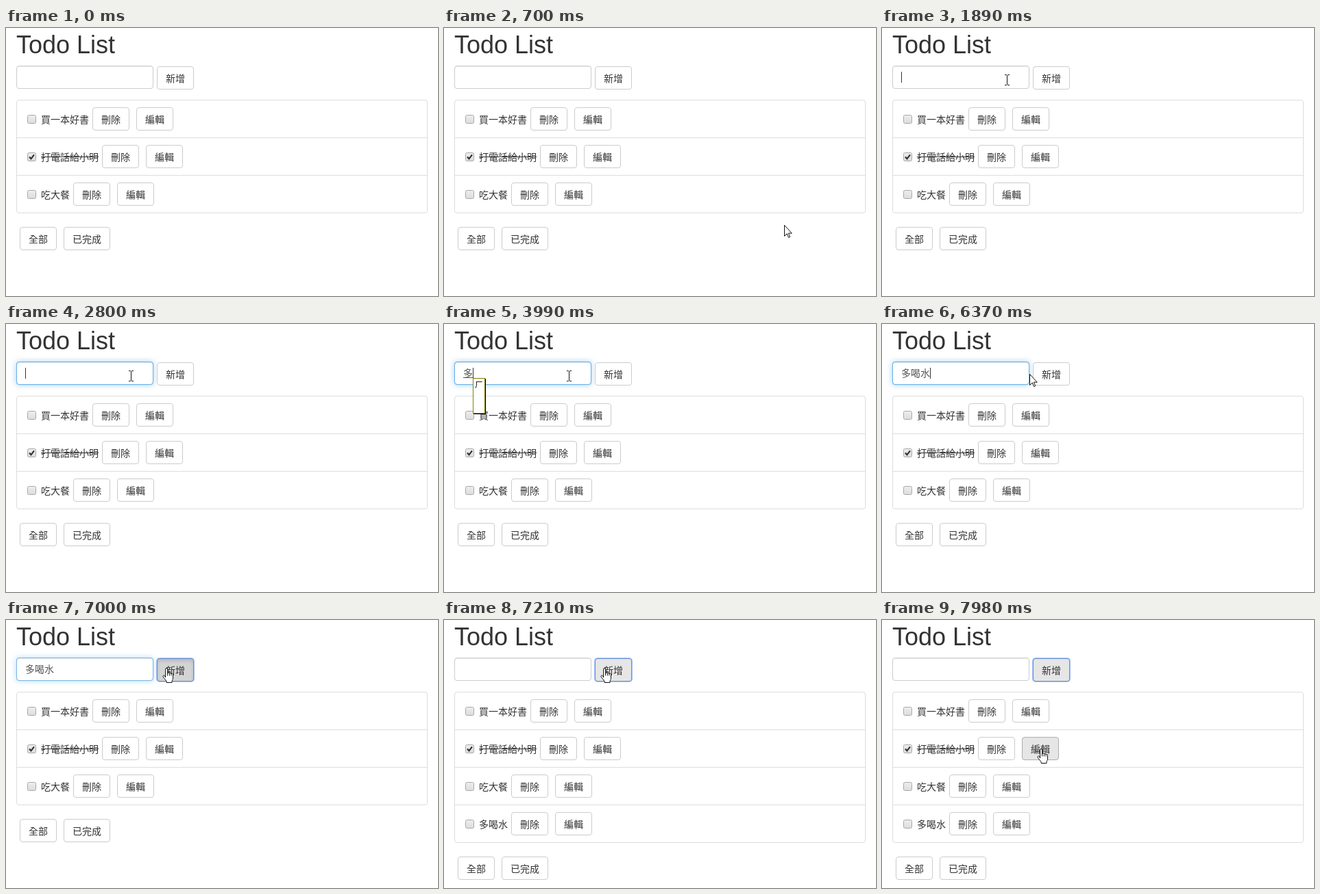
These frames come from a looping animation (630x392 px, 8000 ms). An HTML page:

```html
<!DOCTYPE html>
<html lang="zh-Hant">
<head>
<meta charset="utf-8">
<title>Todo List</title>
<style>
  html, body { margin: 0; width: 100%; height: 100%; overflow: hidden; background: #fff; }
  body {
    position: relative; color: #333;
    font: 300 14px/20px "Noto Sans CJK TC", "Noto Sans CJK", sans-serif;
  }
  body > * { position: absolute; box-sizing: border-box; }
  h1 {
    left: 15px; top: 5.4px; margin: 0; white-space: nowrap;
    font: 400 36px/1.1 "Liberation Sans", Arial, sans-serif;
  }
  .btn {
    box-sizing: border-box; height: 34px; padding: 6px 12px; white-space: nowrap;
    border: 1px solid #ccc; border-radius: 4px; background: #fff;
  }
  .btn.hover { background: #e6e6e6; border-color: #adadad; }
  #add { left: 220px; top: 56px; }
  #add.focus { background: #e6e6e6; border-color: #6d8fc8; box-shadow: 0 0 0 1px rgba(77,144,254,.5); }
  #add.active {
    background: #d4d4d4;
    box-shadow: 0 0 0 1px rgba(77,144,254,.5), inset 0 3px 5px rgba(0,0,0,.125);
  }

  #field, #glow { left: 15px; top: 55px; width: 200px; height: 34px; border-radius: 4px; }
  #field { border: 1px solid #ccc; box-shadow: inset 0 1px 1px rgba(0,0,0,.075); }
  #glow { border: 1px solid #66afe9; box-shadow: 0 0 8px rgba(102,175,233,.6); }
  #typed {
    left: 28px; top: 63px; height: 16px; line-height: 16px; color: #555;
    white-space: nowrap; border-bottom: 1px solid transparent;
  }
  #typed.composing { border-color: #555; }
  #caret { top: 64px; width: 1px; height: 16px; background: #333; }
  #ime {
    top: 79px; width: 18px; height: 52px; padding: 2px 2px 0; z-index: 1;
    background: #fff; border: 1px solid #808000; box-shadow: 1px 1px #000;
    color: #000; font-size: 12px; line-height: 12px; word-break: break-all;
  }

  ul {
    left: 15px; top: 105px; width: 600px; margin: 0; padding: 0; list-style: none;
    border: 1px solid #ddd; border-radius: 4px;
  }
  li { display: flex; align-items: center; height: 54px; padding-left: 15px; }
  li + li { border-top: 1px solid #ddd; }
  li svg { margin-right: 7px; }
  li .btn { margin: 0 5px; }
  .done { text-decoration: line-through; }
  #extra { display: none; }
  .added #extra { display: flex; }
  #filters { left: 20px; top: 291px; display: flex; gap: 10px; }
  .added #filters { top: 346px; }

  #pointer { left: 0; top: 0; overflow: visible; z-index: 2; }
  #pointer path { fill: #fff; stroke: #111; stroke-linejoin: round; }
  #pointer .thin { fill: none; }
</style>
</head>
<body>
  <h1>Todo List</h1>
  <div id="field" class="text"></div>
  <div id="glow"></div>
  <div id="typed"></div>
  <div id="caret"></div>
  <div id="ime"></div>
  <div id="add" class="btn">新增</div>
  <ul></ul>
  <div id="filters"><span class="btn">全部</span><span class="btn">已完成</span></div>

  <svg id="pointer" width="16" height="23">
    <g id="arrow"><path d="M.5 .5v16l3.7-3.6 2.4 5.6 2.1-.9-2.4-5.4h5z"/></g>
    <g id="beam" transform="translate(-3 -8)">
      <path class="thin" d="M0 .5h2.5l1 1 1-1H7M3.5 1v14M0 15.5h2.5l1-1 1 1H7"/>
    </g>
    <g id="hand" transform="translate(-6 -1)">
      <path d="M4.6 14V2.1a1.5 1.5 0 0 1 3 0V8.2a1.4 1.4 0 0 1 2.8 .2a1.3 1.3 0 0 1 2.6 .6a1.3 1.3 0 0 1 2.5 .8V15c0 2-1.5 3.5-1.5 5v1.5H6.2V20C5 17.5 2 15 .9 12.6a1.4 1.4 0 0 1 2.3-1.2z"/>
      <path class="thin" d="M7.6 8v3.5M10.4 8.5v3M13 9v2.5"/>
    </g>
  </svg>

<script>
  const LOOP = 8000, STEP = 70;
  const PRESS = 7000, RELEASE = 7140;
  const $ = id => document.getElementById(id);

  const todos = [['買一本好書'], ['打電話給小明', true], ['吃大餐'], ['多喝水']];
  const box = done => `<svg width="13" height="13">
    <defs><linearGradient id="shade" x2="0" y2="1"><stop stop-color="#eee"/><stop offset="1" stop-color="#dcdcdc"/></linearGradient></defs>
    <rect x=".5" y=".5" width="12" height="12" rx="2" fill="url(#shade)" stroke="#a8a8a8"/>
    ${done ? '<path d="M3 6.5l2.5 2.8L10 3.3" fill="none" stroke="#333" stroke-width="2.2"/>' : ''}</svg>`;
  document.querySelector('ul').innerHTML = todos.map(([text, done], i) =>
    `<li${i === 3 ? ' id="extra"' : ''}>${box(done)}<span${done ? ' class="done"' : ''}>${text}</span>` +
    '<span class="btn">刪除</span><span class="btn">編輯</span></li>').join('');

  // Pointer path: time, x, y of the hot spot
  const path = [
    [420, 531, 374], [700, 496, 288], [1190, 311, 138], [1330, 237, 98], [1540, 182, 76],
    [6020, 182, 76], [6580, 234, 71], [7770, 234, 71], [7910, 232, 140], [7980, 232, 189]
  ];
  const typing = [[0, ''], [3710, '多'], [4130, '多喝'], [4760, '多喝水'], [RELEASE, '']];
  const phonetics = [
    [0, ''], [3430, 'ㄉ'], [3500, 'ㄉㄨ'], [3570, 'ㄉㄨㄛ'], [3710, ''],
    [3990, 'ㄏ'], [4060, 'ㄏㄜ'], [4130, ''],
    [4480, 'ㄕ'], [4550, 'ㄕㄨ'], [4690, 'ㄕㄨㄟ'], [4760, '']
  ];
  const caretOn = [[1890, 2310], [2800, 3290], [3430, 5530], [6020, 6510]];

  const within = (t, a, b) => t >= a && t < b;
  const clamp = v => Math.min(1, Math.max(0, v));
  const latest = (list, t) => list.filter(e => e[0] <= t).pop()[1];
  const show = (el, on) => { el.style.visibility = on ? 'visible' : 'hidden'; };

  function locate(t) {
    const i = path.findIndex(p => p[0] > t);
    if (i < 0) return path[path.length - 1].slice(1);
    if (i === 0) return path[0].slice(1);
    const [t0, x0, y0] = path[i - 1], [t1, x1, y1] = path[i];
    const k = (t - t0) / (t1 - t0);
    return [Math.round(x0 + (x1 - x0) * k), Math.round(y0 + (y1 - y0) * k)];
  }

  const buttons = [...document.querySelectorAll('.btn')];
  function contains(el, x, y) {
    const r = el.getBoundingClientRect();
    return x >= r.left && x < r.right && y >= r.top && y < r.bottom;
  }

  function drawPointer(t) {
    const visible = t >= path[0][0];
    const [x, y] = locate(t);
    let kind = contains($('field'), x, y) ? 'beam' : 'arrow';
    for (const b of buttons) {
      const over = visible && contains(b, x, y);
      b.classList.toggle('hover', over);
      if (over) kind = 'hand';
    }
    $('pointer').style.transform = `translate(${x}px, ${y}px)`;
    for (const k of ['arrow', 'beam', 'hand']) show($(k), visible && k === kind);
  }

  function render(t) {
    const text = latest(typing, t), keys = latest(phonetics, t);
    const end = 28 + 14 * text.length + 'px';
    $('typed').textContent = text;
    $('typed').classList.toggle('composing', within(t, 3710, 5040));
    $('caret').style.left = $('ime').style.left = end;
    show($('caret'), caretOn.some(([a, b]) => within(t, a, b)));
    $('ime').textContent = keys;
    show($('ime'), keys !== '');

    $('glow').style.opacity = t < PRESS ? clamp((t - 1890) / 140) : clamp(1 - (t - 6960) / 200);
    $('add').classList.toggle('focus', t >= PRESS);
    $('add').classList.toggle('active', within(t, PRESS, RELEASE));
    document.body.classList.toggle('added', t >= RELEASE);
    drawPointer(t);
  }

  function tick() {
    const t = performance.now() % LOOP;
    render(Math.floor(t / STEP) * STEP);
    requestAnimationFrame(tick);
  }
  tick();
</script>
</body>
</html>
```
